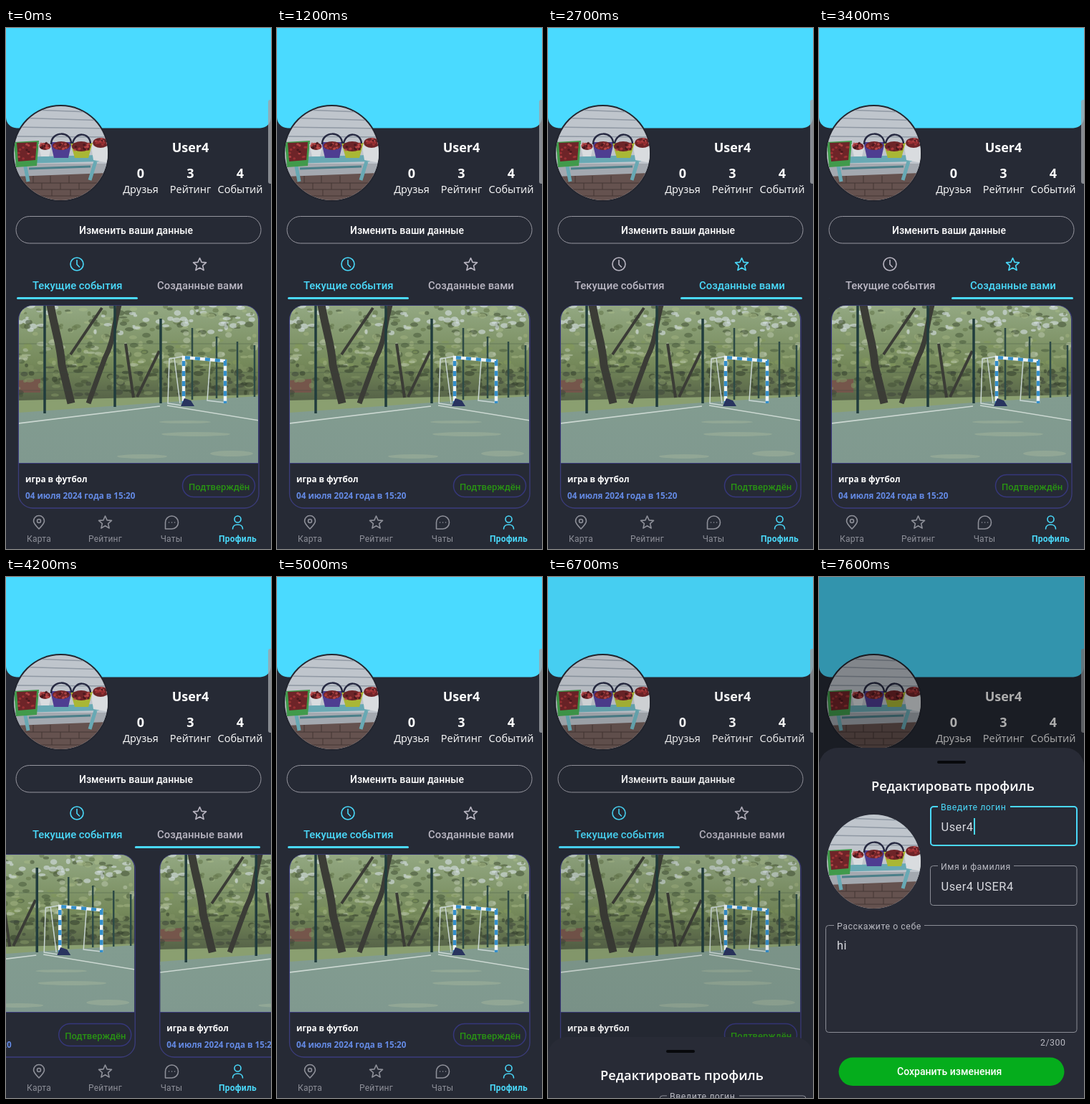
Write an HTML page that moves like this. It is 370 px wide and 726 px high and loops after 8000 ms.

```html
<!DOCTYPE html>
<html lang="ru">
<head>
<meta charset="utf-8">
<title>Профиль</title>
<style>
html, body { margin: 0; width: 100%; height: 100%; overflow: hidden; background: #262a35; }
svg { display: block; width: 370px; height: 726px; }
text { fill: currentColor; font-family: Roboto, sans-serif; }
.soft { font-family: "Open Sans", sans-serif; }
.mid { text-anchor: middle; }
.name { font-size: 18px; font-weight: 700; }
.stat { font-size: 14.5px; }
.button { font-size: 14px; font-weight: 500; }
.tab { font-size: 14.85px; font-weight: 500; }
.nav { font-size: 12px; letter-spacing: .25px; }
.card { font-size: 11.7px; font-weight: 700; }
.label { font-size: 12.3px; letter-spacing: .55px; }
.value { font-size: 16.4px; letter-spacing: .5px; color: #d9dae0; }
.icon { fill: none; stroke: currentColor; stroke-width: 1.6; stroke-linejoin: round; stroke-linecap: round; }
.muted { color: #8e9099; }
.cyan { color: #4ad9fa; }
.white { color: #fff; }
</style>
</head>
<body>
<svg viewBox="0 0 370 726">
  <defs>
    <linearGradient id="trees" x2="0" y2="1">
      <stop offset="0" stop-color="#93a882"/><stop offset=".5" stop-color="#75895a"/>
      <stop offset=".85" stop-color="#535f46"/><stop offset="1" stop-color="#75895f"/>
    </linearGradient>
    <linearGradient id="turf" x2="0" y2="1">
      <stop offset="0" stop-color="#829c90"/><stop offset="1" stop-color="#80998f"/>
    </linearGradient>
    <clipPath id="photoClip"><path d="M18 606V406a19 19 0 0 1 19-19H333a19 19 0 0 1 19 19V606z"/></clipPath>
    <clipPath id="avatarClip"><circle cx="76.5" cy="174.5" r="65.5"/></clipPath>
    <path id="star" class="icon" d="M0-9 2.6-3.1 9-2.6 4.1 1.6 5.6 8 0 4.6-5.6 8-4.1 1.6-9-2.6-2.6-3.1z"/>

    <g id="avatar" clip-path="url(#avatarClip)">
      <path fill="#bfc5cc" d="M10 106h134v138H10z"/>
      <path stroke="#8f98a3" stroke-width="1.5" d="M10 113 144 118M10 125 144 129M10 138 144 140M10 151 144 152M10 195H144"/>
      <path fill="#a4a9b0" d="M10 189H144V207H10z"/>
      <path fill="#65524f" d="M10 207 144 202V244H10z"/>
      <path stroke="#453735" d="M10 216h134M10 225h134M10 234h134M38 206v10M62 206v10M88 206v10M50 216v9M76 216v9M102 216v9M64 225v9M90 225v9"/>
      <path fill="#68a9b4" d="M16 180 128 177 130 186 18 189z"/>
      <path fill="none" stroke="#68a9b4" stroke-width="5" d="M26 188 31 214M125 186 117 212"/>
      <path stroke="#4b7f89" stroke-width="3" d="M32 196 118 193"/>
      <path fill="#419a4b" d="M11 159 46 157 43 192 14 194z"/>
      <path fill="#d9dcdf" d="M45 162H64L60 179H49zM118 159H144V188L122 184z"/>
      <path fill="#4e3d91" d="M62 159H92L87 181H67z"/>
      <path fill="#a9b735" d="M90 160H121L115 181H96z"/>
      <g fill="#6e2428">
        <path d="M15 160 43 159 41 184 17 186z"/>
        <ellipse cx="54.500" cy="165" rx="8" ry="5"/><ellipse cx="77" cy="164" rx="12" ry="6"/>
        <ellipse cx="105" cy="165" rx="13" ry="7"/><ellipse cx="132" cy="160" rx="11" ry="7"/>
      </g>
      <g id="berries"></g>
      <path fill="none" stroke="#272a42" stroke-width="2.500" d="M63 162C63 143 91 143 91 161M93 161C96 144 117 145 118 161"/>
    </g>

    <g id="card">
      <rect x="17.500" y="387" width="335.500" height="282" rx="20" fill="#262a35" stroke="#3c3d7d" stroke-width="1.300"/>
      <g clip-path="url(#photoClip)">
        <path fill="url(#trees)" d="M17 387h336v160H17z"/>
        <path fill="#75564b" d="M17 491 48 489V508H17z"/>
        <g id="foliage"></g>
        <path fill="#8a9f70" d="M17 519 353 511V530L17 541z"/>
        <path fill="url(#turf)" d="M17 536 215 522 353 513V607H17z"/>
        <g fill="none" stroke="#3b3c36">
          <path stroke-width="11" d="M62 386C70 430 76 440 78 470L91 523"/>
          <path stroke-width="7" d="M158 386C149 420 151 435 138 460L115 523"/>
          <path stroke-width="4" d="M167 440 178 515M214 450 183 514M134 390 90 455"/>
        </g>
        <path stroke="#34483e" stroke-opacity=".35" d="M17 440H353M17 480H353M17 505H353"/>
        <path stroke="#213c3d" stroke-width="3.500" d="M54 387V537M152 387V528M216 405V523"/>
        <path stroke="#2d4a45" stroke-width="2.500" d="M260 418V518M294 430V516M323 437V515M347 442V514"/>
        <path fill="none" stroke="#ccd8d2" stroke-width="1.500" d="M17 551 215 527M225 526 353 547"/>
        <path fill="none" stroke="#c9d6d4" stroke-width="1.500" d="M246 458 228 461 226 523 246 526M235 460 243 523M285 464 281 519 306 522"/>
        <g fill="none" stroke-width="4.500">
          <path stroke="#edf3f5" d="M248 527V459L306 464V523"/>
          <path stroke="#348fcb" stroke-dasharray="7 7" d="M248 527V459L306 464V523"/>
        </g>
        <path fill="#29345f" d="M244 527 249 516 258 519 263 527z"/>
        <g fill="#c4cfaa" opacity=".25">
          <ellipse cx="265" cy="566" rx="48" ry="3"/><ellipse cx="250" cy="549" rx="36" ry="2"/>
          <ellipse cx="190" cy="597" rx="35" ry="3"/><ellipse cx="315" cy="593" rx="30" ry="4"/>
        </g>
      </g>
      <path stroke="#3c3d7d" d="M18 606.500H352"/>
      <text class="soft card white" x="27" y="633">игра в футбол</text>
      <text class="soft card" x="27" y="656" color="#648ae4">04 июля 2024 года в 15:20</text>
      <rect x="246.500" y="622.500" width="101" height="31" rx="15.500" fill="none" stroke="#36377b" stroke-width="1.500"/>
      <text x="255" y="644" font-size="13" font-weight="500" color="#299313">Подтверждён</text>
    </g>
  </defs>

  <path fill="#262a35" d="M0 0h370v726H0z"/>
  <path fill="#4adaff" d="M0 0H370V124.500a15 15 0 0 1-15 15H15a15 15 0 0 1-15-15z"/>
  <circle cx="76.500" cy="174.500" r="67.500" fill="#22252f"/>
  <use href="#avatar"/>
  <g class="white">
    <text class="soft name mid" x="257.500" y="173">User4</text>
    <text class="soft name mid" x="188" y="209">0</text>
    <text class="soft name mid" x="257.500" y="209">3</text>
    <text class="soft name mid" x="327" y="209">4</text>
    <text class="soft stat mid" x="188" y="230">Друзья</text>
    <text class="soft stat mid" x="257.500" y="230">Рейтинг</text>
    <text class="soft stat mid" x="327" y="230">Событий</text>
    <rect id="ripple" x="14" y="262" width="342" height="38" rx="19" fill="#4adaff"/>
    <rect x="14" y="262.500" width="342" height="37.500" rx="18.700" fill="none" stroke="#96969f"/>
    <text class="button" x="102" y="287">Изменить ваши данные</text>
  </g>
  <g id="tab0">
    <circle class="icon" cx="99" cy="329" r="9"/><path class="icon" d="M99 323.500V329.500L102.500 333"/>
    <text class="tab" x="37" y="364">Текущие события</text>
  </g>
  <g id="tab1">
    <use href="#star" x="270.500" y="329.500"/>
    <text class="tab" x="211" y="364">Созданные вами</text>
  </g>
  <rect id="indicator" y="375" height="3" rx="1.500" fill="#4ad9fa"/>
  <g id="pager"><use href="#card"/><use href="#card" x="370"/></g>

  <path fill="#262a35" d="M0 670h370v56H0z"/>
  <g class="muted">
    <path class="icon" d="M46 698C42 694 38.500 690.500 38.500 687a7.500 7.500 0 0 1 15 0C53.500 690.500 50 694 46 698z"/>
    <circle class="icon" cx="46" cy="687" r="2.500"/>
    <use href="#star" x="138.500" y="689"/>
    <path class="icon" d="M222.500 698V689a9 9 0 1 1 9 9z"/>
    <path class="icon" stroke-width="2" d="M227.500 689h.1M231.500 689h.1M235.500 689h.1"/>
    <text class="nav mid" x="46" y="716">Карта</text>
    <text class="nav mid" x="138.500" y="716">Рейтинг</text>
    <text class="nav mid" x="231" y="716">Чаты</text>
  </g>
  <g class="cyan">
    <circle class="icon" cx="323.500" cy="684.500" r="4.500"/>
    <path class="icon" d="M316.500 698C316.500 690 330.500 690 330.500 698"/>
    <text class="nav mid" font-weight="700" x="323.500" y="716">Профиль</text>
  </g>
  <rect x="366" y="100" width="7" height="117" rx="3" fill="#9fa3a8" fill-opacity=".8"/>

  <path id="scrim" d="M0 0h370v726H0z"/>
  <g id="sheet">
    <path fill="#282b36" d="M0 726V264a26 26 0 0 1 26-26H344a26 26 0 0 1 26 26V726z"/>
    <rect x="165" y="256" width="40" height="4" rx="2" fill="#08090c"/>
    <text class="soft white" font-size="18.300" font-weight="600" x="73" y="298">Редактировать профиль</text>
    <use href="#avatar" y="222"/>
    <g fill="none" stroke="#8b8d96">
      <rect x="155.500" y="402.500" width="204.500" height="55" rx="4"/>
      <rect x="9.500" y="485.500" width="350.500" height="149" rx="4"/>
    </g>
    <g id="login">
      <rect id="loginBox" x="156" y="320" width="204" height="54" rx="4" fill="none" stroke="currentColor"/>
      <path fill="#282b36" d="M166 317h101v6H166z"/>
      <text class="label" x="170" y="325">Введите логин</text>
    </g>
    <path fill="#282b36" d="M166 400h106v6H166zM21 483h126v6H21z"/>
    <g color="#b9bac2">
      <text class="label" x="170" y="408">Имя и фамилия</text>
      <text class="label" x="25" y="490.500">Расскажите о себе</text>
      <text class="label" x="309" y="653">2/300</text>
    </g>
    <text class="value" x="170.500" y="354">User4</text>
    <text class="value" x="170.500" y="437">User4 USER4</text>
    <text class="value" x="25" y="519">hi</text>
    <rect id="caret" x="216" y="336" width="2" height="23" fill="#4ad9fa"/>
    <rect x="27.500" y="669.500" width="315" height="39.500" rx="19.700" fill="#05ad1c"/>
    <text class="button white" x="109" y="694">Сохранить изменения</text>
  </g>
</svg>
<script>
const LOOP = 8000, CYAN = '#4ad9fa', GREY = '#b9b6c2';
const el = id => document.getElementById(id);
const set = (id, attrs) => Object.entries(attrs).forEach(([k, v]) => el(id).setAttribute(k, v));

let seed = 7;
const random = () => (seed = seed * 16807 % 2147483647) / 2147483647;
const between = (a, b) => a + (b - a) * random();
const pick = list => list[Math.floor(random() * list.length)];
const blob = (x, y, rx, ry, fill, opacity) =>
  `<ellipse cx="${x}" cy="${y}" rx="${rx}" ry="${ry}" fill="${fill}" opacity="${opacity}"/>`;
const scatter = (count, make) => Array.from({ length: count }, make).join('');

el('foliage').innerHTML = scatter(450, () => {
  const x = between(17, 353), y = between(387, 512);
  const shades = y < 425 ? ['#d5dfe4', '#a5b787', '#66784d', '#48583b']
    : y < 470 ? ['#9fb07f', '#82985c', '#4e6040', '#b5c1a6'] : ['#37432f', '#47543a', '#7f9163', '#424a3d'];
  return blob(x, y, between(2, 7), between(1.5, 4), pick(shades), .6);
});
el('berries').innerHTML = [[29, 172, 12, 10], [54.5, 164, 7, 4], [77, 164, 10, 5], [105, 165, 11, 5], [132, 159, 9, 5]]
  .map(([x, y, w, h]) => scatter(14, () =>
    blob(x + between(-w, w), y + between(-h, h), 1.8, 1.6, pick(['#a83538', '#43161c', '#bf4a4b']), .8))).join('');

const progress = (t, start, length) => Math.min(1, Math.max(0, (t - start) / length));
const ease = (t, start, length) => {
  const u = progress(t, start, length);
  return u * u * (3 - 2 * u);
};

function draw(t) {
  // Swipe to the second page and back; the leading edge of the indicator moves first.
  const page = ease(t, 2200, 390) - ease(t, 4000, 385);
  set('pager', { transform: `translate(${-370 * page})` });
  const left = 15 + 170 * (ease(t, 2420, 250) - ease(t, 4175, 250));
  const right = 184 + 171 * (ease(t, 2395, 250) - ease(t, 4200, 250));
  set('indicator', { x: left, width: right - left });
  const second = t >= 2395 && t < 4175;
  set('tab0', { color: second ? GREY : CYAN });
  set('tab1', { color: second ? CYAN : GREY });

  set('ripple', { opacity: .13 * (progress(t, 6250, 120) - progress(t, 6480, 150)) });

  const open = ease(t, 6600, 380);
  set('scrim', { opacity: .32 * open });
  set('sheet', { transform: `translate(0 ${488 * (1 - open)})` });
  const focused = t >= 7250;
  set('login', { color: focused ? CYAN : '#b9bac2' });
  set('loginBox', { 'stroke-width': focused ? 2 : 1, stroke: focused ? CYAN : '#8b8d96' });
  set('caret', { opacity: focused ? 1 : 0 });
}

function frame() {
  draw(performance.now() % LOOP);
  requestAnimationFrame(frame);
}
frame();
</script>
</body>
</html>
```
